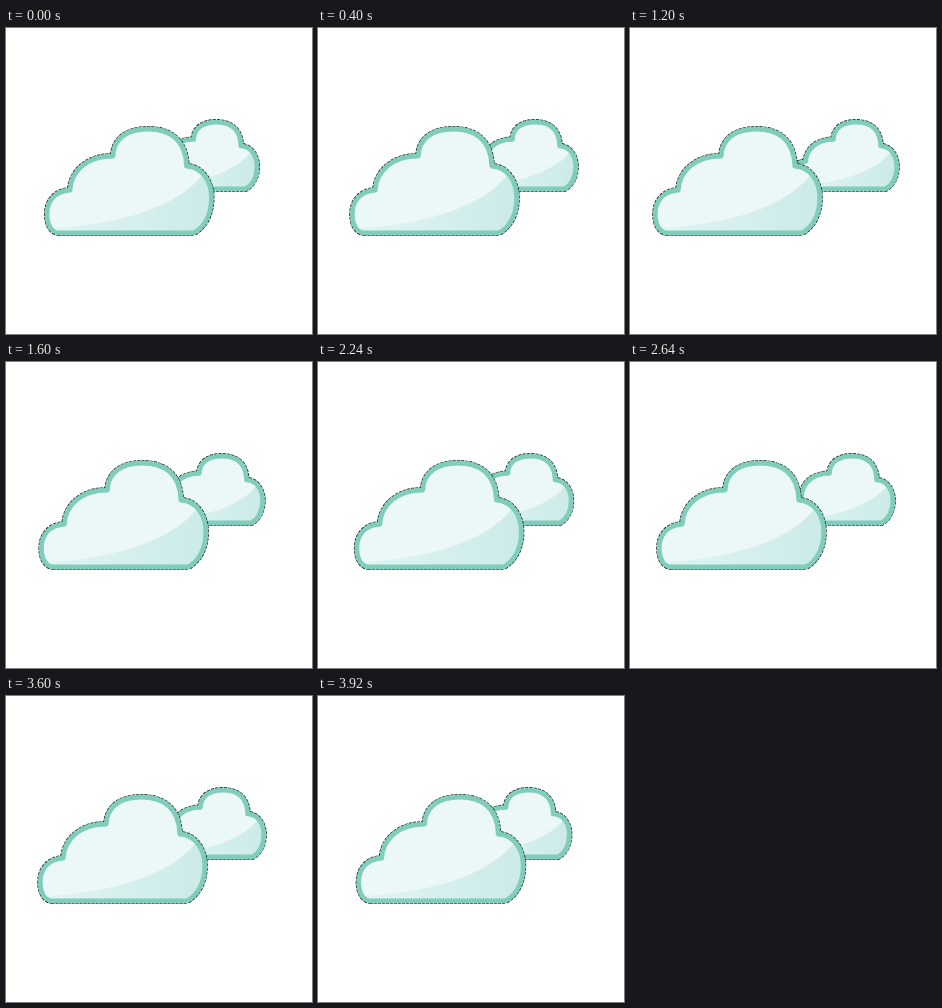
These frames come from a looping animation (306x306 px, 4000 ms). An HTML page:

```html
<!DOCTYPE html>
<html lang="en">
<head>
<meta charset="utf-8">
<title>Drifting clouds</title>
<style>
  html, body { margin: 0; width: 100%; height: 100%; overflow: hidden; background: #fff; }
  svg { display: block; width: 100vw; height: 100vh; }
  path { vector-effect: non-scaling-stroke; }
  .edge { fill: none; stroke: #151c1a; stroke-width: 6; stroke-dasharray: 3 1; }
  .rim { fill: none; stroke: #80cdbc; stroke-width: 4.8; }
</style>
</head>
<body>
<svg viewBox="0 0 306 306">
  <defs>
    <linearGradient id="shade">
      <stop offset="0" stop-color="#e0f4f3"/>
      <stop offset="1" stop-color="#cbebe8"/>
    </linearGradient>
    <path id="outline" stroke-linejoin="round" d="M54 205C46 205 41 198 41 186C41 173 49 163 64 162
      C65 143 81 128 107 128C107.5 110 122 101 142 101C163 101 180 111 180.5 138
      C197 139 205.5 154 205.5 170C205.5 186 199 199 187.5 205Z"/>
    <g id="cloud">
      <use href="#outline" class="edge"/>
      <use href="#outline" fill="#ecf7f8"/>
      <path fill="url(#shade)" d="M46 200C110 197 172 180 198 145C203 152 205.5 161 205.5 170C205.5 186 199 199 187.5 205H54Z"/>
      <use href="#outline" class="rim"/>
    </g>
  </defs>
  <g id="back"><use href="#cloud" transform="translate(118.7 29) scale(.644)"/></g>
  <g id="front"><use href="#cloud"/></g>
</svg>
<script>
  const LOOP = 4000, STEP = 80, REACH = 20.5;
  const back = document.getElementById('back');
  const front = document.getElementById('front');

  // [seconds, phase in half turns]: out and back, slightly faster around the far point
  const knots = [[0, 0], [.72, .7], [1.04, 1.16], [1.2, 1.32], [1.6, 1.65], [2, 2]];

  function phaseAt(s) {
    const i = Math.max(1, knots.findIndex(k => k[0] >= s));
    const [s0, p0] = knots[i - 1], [s1, p1] = knots[i];
    return p0 + (p1 - p0) * (s - s0) / (s1 - s0);
  }

  function draw(now) {
    const t = Math.floor(now % LOOP / STEP) * STEP;
    const s = Math.min(t, LOOP - t) / 1000; // second half runs in reverse
    const drift = REACH * (1 - Math.cos(Math.PI * phaseAt(s))) / 2;
    front.setAttribute('transform', `translate(${-drift} 0)`);
    back.setAttribute('transform', `translate(${drift} 0)`);
    requestAnimationFrame(draw);
  }
  draw(performance.now());
</script>
</body>
</html>
```
